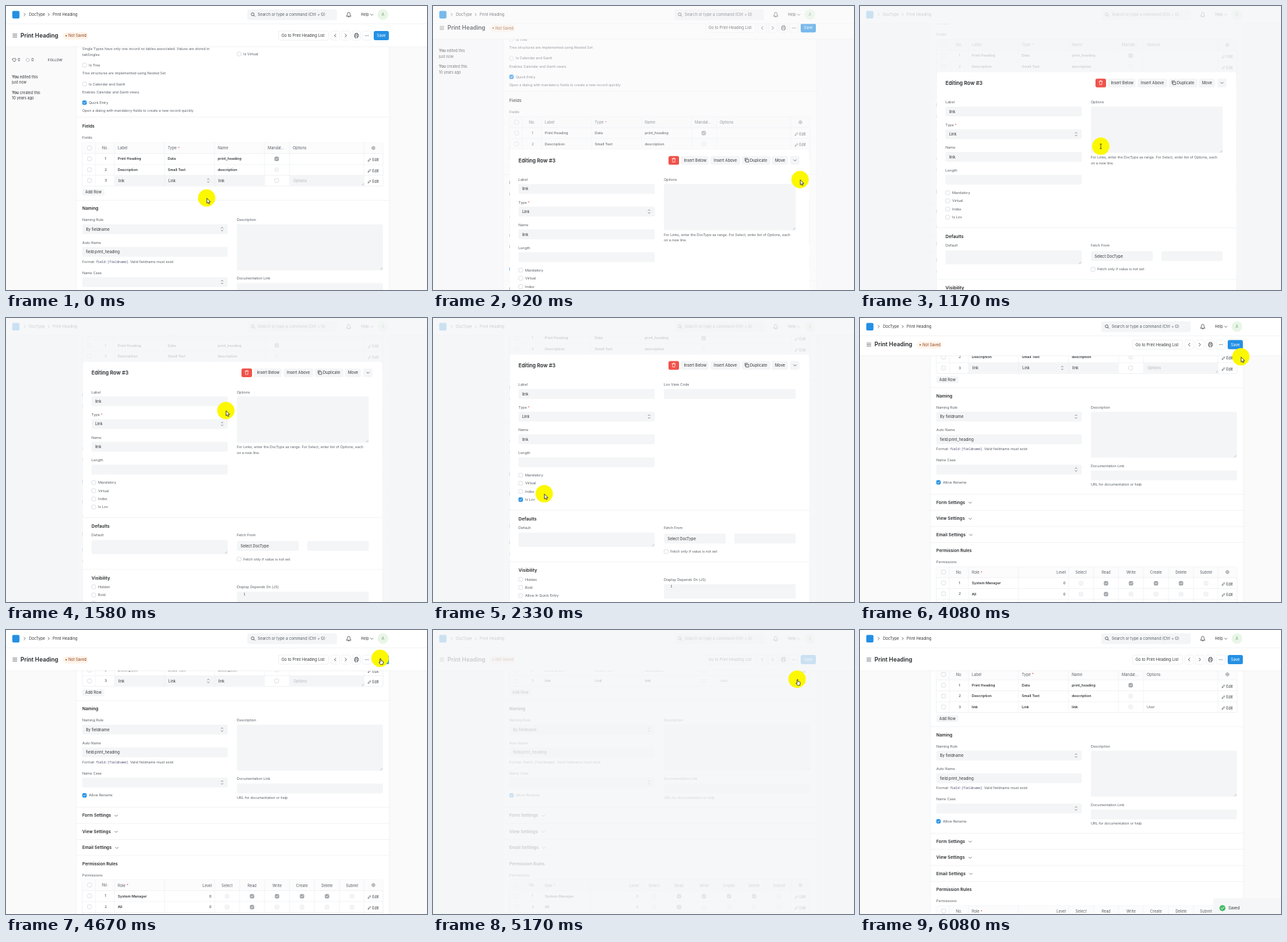
An HTML page for the animation above (6.66 s loop, 640x432 px).

```html
<!DOCTYPE html>
<html lang="en">
<head>
<meta charset="utf-8">
<title>Form editing demo</title>
<style>
  html, body { margin: 0; width: 100%; height: 100%; overflow: hidden; background: #fff; }
  svg { display: block; width: 640px; height: 432px; }
  text { font-family: Inter, Roboto, sans-serif; white-space: pre; }
  .b { font-weight: 600; }
  .m { font-family: "Noto Sans Mono", "DejaVu Sans Mono", monospace; }
  .e { text-anchor: end; }
  .c { text-anchor: middle; }
</style>
</head>
<body>
<svg id="stage" viewBox="0 0 640 432"></svg>
<script>
const INK = '#333639', SOFT = '#585e64', PALE = '#b4bac0';
const PAPER = '#fff', SIDE = '#fafafb', FIELD = '#f4f5f6', LINE = '#eceef1';
const BLUE = '#2490e4', VEIL = '#f4f5f7', HALO = '#fcf800';

// Drawing helpers; text is placed by its left edge and vertical middle.
const text = (x, y, s, size = 5.4, fill = SOFT, cls = '') =>
  `<text x="${x}" y="${y + size * .36}" font-size="${size}" fill="${fill}" class="${cls}">${s}</text>`;
const rect = (x, y, w, h, fill, r = 0, more = '') =>
  `<rect x="${x}" y="${y}" width="${w}" height="${h}" rx="${r}" fill="${fill}" ${more}/>`;
const path = (d, color = SOFT, w = .8, fill = 'none') =>
  `<path d="${d}" fill="${fill}" stroke="${color}" stroke-width="${w}" stroke-linejoin="round" stroke-linecap="round"/>`;
const circle = (x, y, r, fill, more = '') => `<circle cx="${x}" cy="${y}" r="${r}" fill="${fill}" ${more}/>`;
const group = (id, body, more = '') => `<g id="${id}" ${more}>${body}</g>`;
const hline = (y, x1 = 107, x2 = 583) => path(`M${x1} ${y}H${x2}`, LINE, .7);
const down = (x, y) => path(`M${x - 2} ${y - 1}l2 2l2-2`);
const right = (x, y) => path(`M${x - 1} ${y - 2}l2 2l-2 2`);
const heading = (x, y, s, size = 6.5) => text(x, y, s, size, '#25282b', 'b');
const star = (x, y) => text(x, y, '*', 5.4, '#e05040');
const arrows = (x, y) => path(`M${x - 1.3} ${y - 1.5}l1.3-1.4l1.3 1.4M${x - 1.3} ${y + 1.5}l1.3 1.4l1.3-1.4`, SOFT, .7);
const grip = (x, y) => path(`M${x - 3} ${y}l3-3M${x - 1.2} ${y}l1.2-1.2`, '#a0a4a8', .5);

function check(x, y, kind = 'empty') {
  const fill = { empty: PAPER, on: BLUE, grey: '#a0a5aa', faint: FIELD }[kind];
  const edge = { empty: '#cdd2d8', on: BLUE, grey: '#a0a5aa', faint: '#e6e9ec' }[kind];
  const tick = kind == 'on' || kind == 'grey' ? path(`M${x - 1.6} ${y}l1.2 1.3l2.1-2.5`, '#fff', .8) : '';
  return rect(x - 3, y - 3, 6, 6, fill, 1.6, `stroke="${edge}" stroke-width=".7"`) + tick;
}
const option = (x, y, s, kind) => check(x + 3.3, y, kind) + text(x + 10, y, s);
const field = (x, y, w, h, s = '', select = false) => rect(x, y, w, h, FIELD, 2) +
  text(x + 5.4, y + 7.6, s, 5.85, INK) + (select ? arrows(x + w - 8.5, y + h / 2) : '');
const area = (x, y, w, h) => field(x, y, w, h) + grip(x + w - 1, y + h - 1);
const button = (x, y, w, h, s, dx = 5) => rect(x, y, w, h, FIELD, 2.5) + text(x + dx, y + h / 2, s, 5.85, INK);
const gear = (x, y) => circle(x, y, 2, 'none', `stroke="${SOFT}" stroke-width=".6"`) +
  circle(x, y, .7, SOFT) + circle(x, y, 2.7, 'none', `stroke="${SOFT}" stroke-width=".6" stroke-dasharray=".8 1.3"`);
const edit = y => path(`M550.5 ${y + 2}l.5-1.6l2.6-2.6l1.1 1.1l-2.6 2.6z`, INK, .6) + text(557, y, 'Edit', 5.5, INK);

const nav = () => rect(0, 0, 640, 27, PAPER) + hline(27, 0, 640) +
  rect(9.5, 7.5, 11, 11.5, BLUE, 2) + right(28.5, 13) + text(35, 13, 'DocType', 5.85, INK) +
  right(65, 13) + text(71, 13, 'Print Heading', 5.85, INK) +
  rect(367, 5, 136, 16.5, FIELD, 3) +
  circle(375, 12.6, 2.2, 'none', `stroke="${INK}" stroke-width=".7"`) + path('M376.7 14.3l1.5 1.5', INK) +
  text(382.5, 13, 'Search or type a command (Ctrl + G)', 5.9) +
  path('M517.8 15.2q1.2-.8 1.2-3.2a2 2.4 0 0 1 4 0q0 2.4 1.2 3.2zM520 16.7h2', INK, .7) +
  text(539.5, 13, 'Help', 5.5, INK) + down(556, 13.3) +
  circle(573, 13, 8, '#e8f6e6') + text(573, 13, 'A', 5.6, '#6a9a6c', 'c');

const outlined = (x, w) => rect(x, 38, w, 14, PAPER, 2.5, `stroke="${LINE}" stroke-width=".8"`);
const head = () => rect(0, 27, 640, 35, PAPER) + hline(62, 0, 640) +
  path('M10.5 42.7h6M10.5 45h6M10.5 47.3h6') + text(22, 44.8, 'Print Heading', 8.75, '#25282b', 'b') +
  group('unsaved', rect(86.5, 40, 38.5, 11, '#fff3ea', 5.5) + circle(91.5, 45.3, 1.1, '#a8501e') +
    text(95, 45.3, 'Not Saved', 5.6, '#8c4318')) +
  outlined(414.5, 76) + text(419, 45, 'Go to Print Heading List', 5.83, INK) +
  [494, 510, 526, 542].map(x => outlined(x, 13)).join('') +
  path('M501.4 42.8l-2 2.2l2 2.2M515.6 42.8l2 2.2l-2 2.2', INK) +
  path('M531 43.3v-1.8h3.6v1.8M530.6 46.5h-.8v-3.2h6v3.2h-.8M531 45.4h3.6v3h-3.6z', INK, .7) +
  [546.5, 548.7, 550.9].map(x => circle(x, 45, .6, INK)).join('') +
  rect(559, 38, 23, 14, BLUE, 2.5) + text(570.5, 45, 'Save', 5.83, '#fff', 'c');

const sidebar = () =>
  path('M12.5 84.7l-2.4-2.5a1.5 1.5 0 0 1 2.4-1.9a1.5 1.5 0 0 1 2.4 1.9z', INK, .7) + text(18, 82, '0', 5.6, INK) +
  circle(33, 82, 2.5, 'none', `stroke="${PALE}" stroke-width=".8"`) + text(38.5, 82, '0', 5.6, INK) +
  text(63.5, 82, 'FOLLOW', 5.3, INK) +
  text(9, 107.5, '<tspan class="b">You</tspan> edited this', 5.6, INK) + text(9, 116, 'just now', 5.6, INK) +
  text(9, 131.5, '<tspan class="b">You</tspan> created this', 5.6, INK) + text(9, 140, '10 years ago', 5.6, INK);

function grid(top, rows, columns) {
  const bottom = top + 16.5 * (rows + 1);
  let s = rect(116, top, 457, bottom - top, PAPER, 2, `stroke="${LINE}" stroke-width=".8"`) +
    rect(116, top, 457, 16.5, '#fcfcfd', 2) +
    path(columns.map(x => `M${x} ${top}V${bottom}`).join(''), LINE, .7) +
    text(146, top + 8, 'No.', 5.6) + gear(558.5, top + 8);
  for (let i = 0; i <= rows; i++) {
    const y = top + 8 + i * 16.5;
    s += check(127, y);
    if (i) s += hline(y - 8, 116, 573) + text(150, y, i, 5.4, INK) + edit(y + 1.6);
  }
  return s;
}

const cells = (y, list) => list.map((s, i) => text(170 + 76 * i, y, s, 5.4, INK, 'b')).join('');
const fieldsGrid = () => grid(208, 3, [136, 165, 241, 317, 393, 431, 544]) +
  ['Label', 'Type', 'Name', 'Mandat…'].map((s, i) => text(170 + 76 * i, 216, s, 5.7)).join('') +
  star(261.5, 216) + text(436, 216, 'Options', 5.7) +
  cells(232.5, ['Print Heading', 'Data', 'print_heading']) + check(411.5, 232.5, 'grey') +
  cells(249, ['Description', 'Small Text', 'description']) + check(411.5, 249, 'faint') +
  group('rowEdit', rect(165, 257.5, 228, 15.5, FIELD) + rect(431, 257.5, 113.5, 15.5, FIELD) +
    path('M241 257V273M317 257V273', LINE) +
    ['link', 'Link', 'link'].map((s, i) => text(171 + 76 * i, 265.5, s, 5.6, INK)).join('') +
    arrows(307.5, 265.5) + check(411.5, 265.5) + text(437, 265.5, 'Options', 5.6, PALE) + grip(544, 272.5)) +
  group('rowDone', cells(265.5, ['link', 'Link', 'link']) + check(411.5, 265.5, 'faint') +
    text(436, 265.5, 'User', 5.4));

function permissions() {
  const names = ['Select', 'Read', 'Write', 'Create', 'Delete', 'Submit'];
  let s = grid(568, 3, [136, 165, 241, 317, 355, 393, 431, 469, 507, 544]) +
    text(170, 576.5, 'Role', 5.7) + star(183.5, 576.5) + text(313, 576.5, 'Level', 5.7, SOFT, 'e') +
    cells(593, ['System Manager']) + cells(609.5, ['All']);
  for (const y of [593, 609.5]) s += text(312.5, y, '0', 5.4, INK, 'e');
  names.forEach((name, i) => {
    const x = 336 + 38 * i;
    s += text(x, 576.5, name, 5.7, SOFT, 'c') +
      check(x, 593, i > 0 && i < 5 ? 'grey' : 'faint') + check(x, 609.5, i == 1 ? 'grey' : 'faint');
  });
  return s;
}

const page = () => rect(0, 0, 640, 900, SIDE) + rect(107, 0, 476, 900, PAPER) +
  path('M107 0V900M583 0V900', LINE, .7) + sidebar() +
  text(116, 65.3, 'Single Types have only one record no tables associated. Values are stored in', 5.35) +
  text(116, 74, 'tabSingles', 5.35) + option(351, 73, 'Is Virtual') +
  option(116, 90, 'Is Tree') + text(116, 102, 'Tree structures are implemented using Nested Set', 5.35) +
  option(116, 118.7, 'Is Calendar and Gantt') + text(116, 131, 'Enables Calendar and Gantt views.', 5.35) +
  option(116, 147, 'Quick Entry', 'on') +
  text(116, 159.5, 'Open a dialog with mandatory fields to create a new record quickly', 5.35) +
  hline(169) + heading(116, 183, 'Fields') + text(116, 200.5, 'Fields') + fieldsGrid() +
  button(116, 278, 33.5, 10.5, 'Add Row', 4.5) +
  hline(295.5) + heading(116, 307.7, 'Naming') +
  text(116, 325.3, 'Naming Rule') + field(116, 332, 221, 15, 'By fieldname', true) +
  text(116, 359.7, 'Auto Name') + field(116, 366.5, 221, 15, 'field:print_heading') +
  text(116, 388.8, 'Format: <tspan class="m" font-size="4.8" fill="#4c4c70">field:[fieldname]</tspan>. Valid fieldname must exist', 5.35) +
  text(116, 405.7, 'Name Case') + field(116, 412.5, 221, 15, '', true) +
  option(116, 439.5, 'Allow Rename', 'on') +
  text(351, 325.3, 'Description') + area(351, 332, 222, 70) +
  text(351, 414.5, 'Documentation Link') + field(351, 421.5, 222, 15) +
  text(351, 443, 'URL for documentation or help', 5.35) +
  ['Form', 'View', 'Email'].map((s, i) => {
    const y = 470 + 24.5 * i;
    return hline(y - 12.3) + heading(116, y, s + ' Settings') + down([167.5, 167.5, 168.5][i], y + .5);
  }).join('') +
  hline(531) + heading(116, 543.2, 'Permission Rules') + text(116, 560.7, 'Permissions') + permissions();

const modal = () => rect(117, 100, 455, 600, PAPER, 3) + heading(130, 116.7, 'Editing Row #3', 7.8) +
  rect(358, 110, 16, 13.3, '#f0524a', 2.5) +
  path('M363.4 114.3h5.2M365 114.2v-1h2v1M364 114.5l.3 4.8h3.4l.3-4.8', '#fff', .7) +
  button(376.5, 110, 42.5, 13.3, 'Insert Below') + button(422, 110, 45, 13.3, 'Insert Above') +
  button(469.5, 110, 43.5, 13.3, 'Duplicate', 12.3) +
  path('M476 115.2h4v4h-4zM474.3 117.5v-4h4', INK, .7) +
  button(515, 110, 24.5, 13.3, 'Move') + button(543, 110, 14, 13.3, '') + down(550.3, 116.7) +
  text(130, 146, 'Label') + field(130, 152.5, 207, 15, 'link') +
  text(130, 180.5, 'Type') + star(144, 180.5) + field(130, 187, 207, 15, 'Link', true) +
  text(130, 215, 'Name') + field(130, 221.7, 207, 15, 'link') +
  text(130, 249.5, 'Length') + field(130, 256.3, 207, 15) +
  option(130, 283.7, 'Mandatory') + option(130, 296, 'Virtual') + option(130, 308.5, 'Index') +
  option(130, 320.8, 'Is Lov') + group('lovOn', check(133.3, 320.8, 'on')) +
  group('options', text(351, 146, 'Options') + area(351, 152.5, 200.5, 70.5) +
    text(351, 229.5, 'For Links, enter the DocType as range. For Select, enter list of Options, each', 5.35) +
    text(351, 238.3, 'on a new line.', 5.35)) +
  group('lovView', text(351, 146, 'Lov View Code') + field(351, 152.5, 200.5, 15) +
    group('focus', rect(351, 152.1, 201, 15.6, FIELD, 2, 'stroke="#c3c9d1" stroke-width=".9"')) +
    text(356.4, 160.1, '<tspan id="code"></tspan>', 5.85, INK) +
    group('caret', path('M414.8 157v6.6', INK, .6))) +
  hline(337, 117, 572) + heading(130, 349.7, 'Defaults', 6.8) +
  text(130, 363.5, 'Default') + area(130, 371, 207, 21.5) +
  text(351, 363.5, 'Fetch From') + field(351, 372.7, 94, 15, 'Select DocType') + field(458, 372.7, 93.5, 15) +
  option(351, 400, 'Fetch only if value is not set') +
  hline(415.5, 117, 572) + heading(130, 428.5, 'Visibility', 6.8) +
  ['Hidden', 'Bold', 'Allow In Quick Entry', 'Translatable'].map((s, i) => option(130, 442.2 + 12.4 * i, s)).join('') +
  text(351, 442.5, 'Display Depends On (JS)') + field(351, 449.5, 200.5, 22) + text(361, 453.2, '1', 5, INK, 'm');

const toast = () => rect(537, 408, 106, 30, '#f5f6f7', 3) + circle(551, 423, 4.6, '#48bb68') +
  path('M548.9 423.1l1.5 1.6l2.7-3.2', '#fff', .9) + text(560, 423, 'Saved', 5.85, INK);

const pointer = () => circle(0, 0, 13.2, HALO) +
  group('arrow', path('M.3 .8v7.2l1.7-1.5l1.2 2.6l1.3-.6l-1.2-2.5h2.2z', '#222', .8, '#fff')) +
  group('beam', path('M-1.2-3.2h2.4M0-3.2v6.8M-1.2 3.6h2.4', '#222', .7)) +
  group('hand', path('M-.2 6.2V.9q.8-1.1 1.5 0v2.8l3 .8q.8.4.6 1.4l-.7 3.5h-3.6l-2.4-3q.4-1 1.6-.2z', '#222', .8, '#fff'));

const stage = document.getElementById('stage');
stage.innerHTML = group('page', page()) + group('head', head()) + group('nav', nav()) +
  group('veil', rect(0, 0, 640, 432, VEIL)) + group('modal', modal()) +
  group('toast', toast()) + group('pointer', pointer());

const part = {};
stage.querySelectorAll('[id]').forEach(el => part[el.id] = el);
const show = (id, on) => part[id].style.display = on ? '' : 'none';
const move = (id, x, y) => part[id].setAttribute('transform', `translate(${x} ${y})`);

// Tracks are lists of [tick, values...], linear between entries.
const TICK = 500 / 6, LOOP = 6660, LAST = 73;
const scroll = [[10, 0], [14, -157], [16, -157], [20, -202], [46, -202], [47, -189.5], [50, -189.5],
  [52, -188], [64, -188], [65, -148.5]];
const headY = [[10, 0], [13, -35], [46, -35], [49, -4.5], [50, 0]];
const veilAlpha = [[10, 0], [12, .8], [46, .8], [47, 0], [58, 0], [60, .8], [64, .8], [66, 0]];
const toastY = [[69, 26], [73, 0]];
const pointerXY = [[0, 305, 292], [2, 350, 279], [4, 430, 272], [6, 540, 260], [8, 575, 253], [10, 564, 266],
  [11, 558, 264], [14, 366, 213.3], [16, 362, 200], [20, 325, 121], [22, 300, 150], [25, 142, 279],
  [26, 142, 279], [28, 169, 267.3], [32, 138, 271], [34, 190, 230], [38, 420, 120], [40, 490, 115],
  [42, 571.3, 104.2], [44, 605, 97], [46, 602, 92], [49, 579, 59], [50, 573, 46], [52, 570, 41],
  [58, 568, 44], [62, 553.5, 74.7]];

function at(track, n) {
  const i = track.findIndex(k => k[0] > n);
  if (i < 0) return track[track.length - 1].slice(1);
  if (!i) return track[0].slice(1);
  const [a, b] = [track[i - 1], track[i]], p = (n - a[0]) / (b[0] - a[0]);
  return a.slice(1).map((v, j) => v + (b[j + 1] - v) * p);
}

function draw(now) {
  let n = Math.min(LAST, Math.floor((now % LOOP + 4) / TICK));
  if (n % 6 == 3 && n < LAST) n--; // every sixth tick repeats the one before
  const [s] = at(scroll, n), open = n >= 11 && n < 47;
  move('page', 0, s);
  move('modal', 0, s + 157.4);
  move('head', 0, at(headY, n)[0]);
  move('toast', 0, at(toastY, n)[0]);
  move('pointer', ...at(pointerXY, n));
  part.veil.style.opacity = at(veilAlpha, n)[0];
  show('modal', open);
  show('unsaved', n < 65);
  show('rowEdit', n < 58);
  show('rowDone', n >= 58);
  show('lovOn', n >= 26);
  show('options', n < 28);
  show('lovView', n >= 28);
  show('focus', n >= 37);
  show('caret', n >= 40 && n < 44);
  part.code.textContent = n >= 40 ? 'VIEW230620000001' : '';
  show('toast', n >= 69);
  show('pointer', n < 66);
  const beam = n >= 13 && n < 17 || n >= 37 && n < 41, hand = n >= 51;
  show('beam', beam);
  show('hand', hand);
  show('arrow', !beam && !hand);
}

const start = performance.now();
function loop() {
  draw(performance.now() - start);
  requestAnimationFrame(loop);
}
loop();
</script>
</body>
</html>
```
